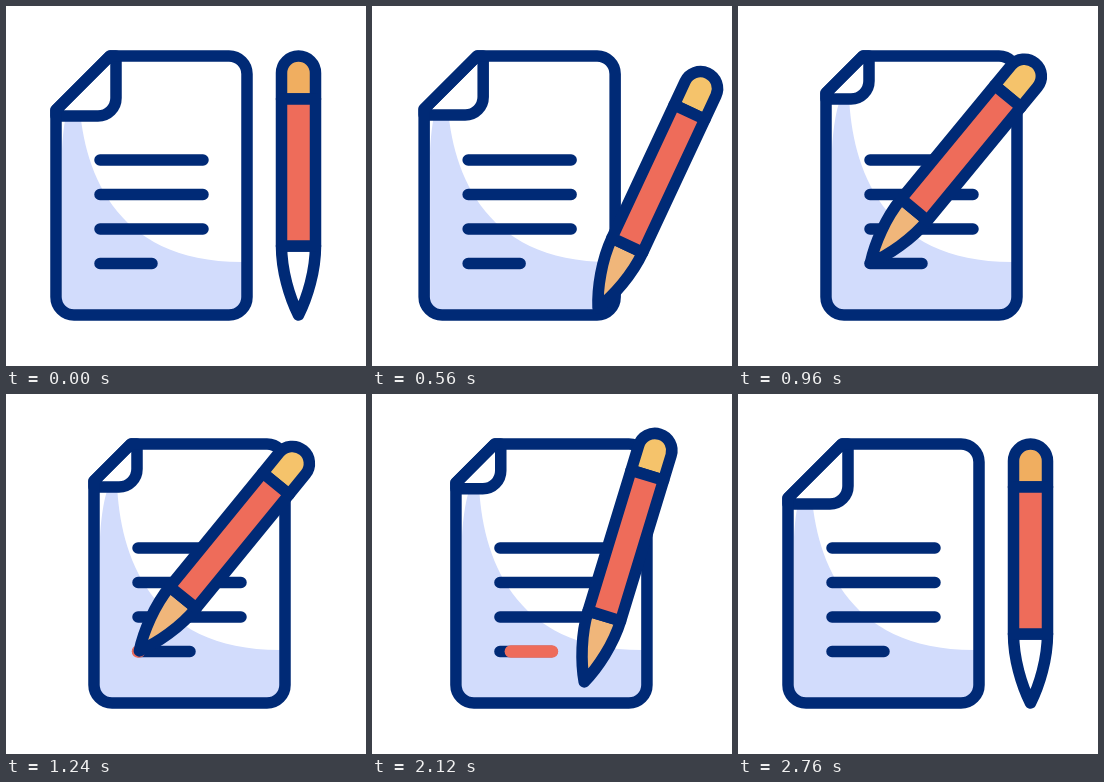
Animation of 360 by 360 pixels, one loop 3000 ms. Source, as an HTML page:

```html
<!DOCTYPE html>
<html lang="en">
<head>
<meta charset="utf-8">
<title>Paper and pen</title>
<style>
  html, body { margin: 0; height: 100%; overflow: hidden; background: #fff; }
  svg { display: block; width: 100%; height: 100%; }
  .ink { stroke: #002a76; stroke-width: 11.5; stroke-linecap: round; stroke-linejoin: round; }
</style>
</head>
<body>
<svg viewBox="0 0 360 360" fill="none">
  <g id="paper">
    <path fill="#d2dcfc" d="M56 309V150C56 130 60 100 66 90H73C76 160 105 256 236 256V309Z"/>
    <path id="fold" class="ink" fill="#fff"/>
    <path id="sheet" class="ink"/>
    <path class="ink" d="M94 154H197M94 188.5H197M94 223H197M94 257.5H146"/>
    <path id="mark" stroke="#ee6c5a" stroke-width="12.5" stroke-linecap="round"/>
  </g>
  <g id="pen" class="ink">
    <path id="cap" d="M-17-86.5V-112.5A17 17 0 0 1 17-112.5V-86.5Z"/>
    <path id="nib" d="M-17 60.5C-17 85-9 112 0 129.5C9 112 17 85 17 60.5Z"/>
    <path fill="#ee6c5a" d="M-17-86.5H17V60.5H-17Z"/>
  </g>
</svg>
<script>
const LOOP = 3000;
const $ = id => document.getElementById(id);
const set = (id, name, value) => $(id).setAttribute(name, value);

// Pen cues: time, centre x, centre y, angle
const cues = [
  [20, 292.5, 179.5, 0],
  [420, 292, 180.5, 16.5],
  [560, 281, 184.5, 25],
  [760, 226.8, 167.2, 35.9],
  [960, 214.8, 157, 39.5],
  [1200, 214.8, 157, 39.5],
  [1650, 238, 139.3, 24.9],
  [2120, 250, 164, 17],
  [2750, 292.5, 179.5, 0]
];

// Eased progress from 0 to 1 between two times
function ramp(t, start, end) {
  const u = Math.min(1, Math.max(0, (t - start) / (end - start)));
  return (1 - Math.cos(Math.PI * u)) / 2;
}

const slope = (i, k) =>
  cues[i] && cues[i + 1] ? (cues[i + 1][k] - cues[i][k]) / (cues[i + 1][0] - cues[i][0]) : 0;

function tangent(i, k) {
  const a = slope(i - 1, k), b = slope(i, k);
  return a * b > 0 ? 2 * a * b / (a + b) : 0;
}

// Monotone cubic through the cues
function follow(t, k) {
  const last = cues.length - 1;
  if (t <= cues[0][0]) return cues[0][k];
  if (t >= cues[last][0]) return cues[last][k];
  const i = cues.findIndex(c => c[0] > t) - 1;
  const span = cues[i + 1][0] - cues[i][0];
  const s = (t - cues[i][0]) / span, r = 1 - s;
  return cues[i][k] * (1 + 2 * s) * r * r + cues[i + 1][k] * s * s * (3 - 2 * s)
    + span * s * r * (tangent(i, k) * r - tangent(i + 1, k) * s);
}

function draw(t) {
  const shift = ramp(t, 490, 955) - ramp(t, 2050, 2385);
  const size = 60 - 17 * shift, edge = 44 + size;
  set('paper', 'transform', `translate(${38 * shift} 0)`);
  set('sheet', 'd', `M50 ${edge}L${edge} 50H223a18 18 0 0 1 18 18V291a18 18 0 0 1-18 18H68a18 18 0 0 1-18-18Z`);
  set('fold', 'd', `M${edge} 50H${50 + size}v${size - 18}a18 18 0 0 1-18 18H50V${edge}Z`);

  const from = 94 + 52 * ramp(t, 2000, 2400), to = 94 + 52 * ramp(t, 1200, 1650);
  set('mark', 'd', t > 1200 && t < 2400 ? `M${from} 257.5H${to}` : '');

  set('pen', 'transform', `translate(${follow(t, 1)} ${follow(t, 2)}) rotate(${follow(t, 3)})`);
  const resting = t < 40 || t >= 2760;
  set('cap', 'fill', resting ? '#f0ae60' : '#f5c36b');
  set('nib', 'fill', resting ? '#fff' : '#f0b67a');
}

function tick() {
  draw(performance.now() % LOOP);
  requestAnimationFrame(tick);
}
tick();
</script>
</body>
</html>
```
